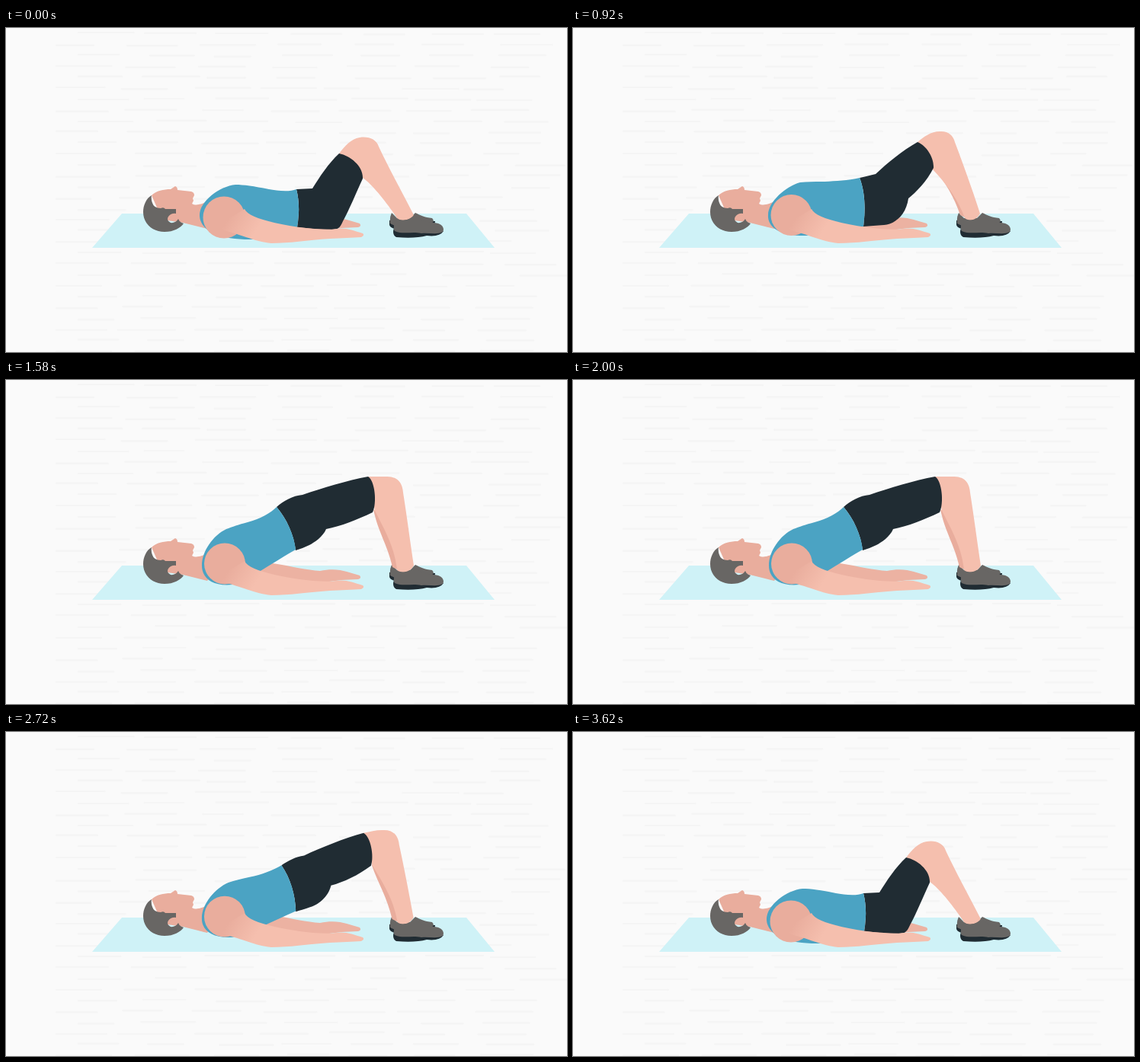
These frames come from a looping animation (736x426 px, 3640 ms). An HTML page:

```html
<!DOCTYPE html>
<html lang="en">
<head>
<meta charset="utf-8">
<title>Glute bridge</title>
<style>
  html, body { margin: 0; width: 100%; height: 100%; overflow: hidden; background: #fafafa; }
  svg { display: block; width: 736px; height: 426px; }
  .skin { fill: #f5bfae; }
  .shade { fill: #e9ad9d; }
  .grey { fill: #686664; }
  .dark { fill: #202c33; }
  .shirt { fill: #4ba3c3; }
</style>
</head>
<body>
<svg viewBox="0 0 736 426">
  <defs>
    <linearGradient id="armTone" gradientUnits="userSpaceOnUse" x1="296" y1="243" x2="330" y2="264">
      <stop stop-color="#e9ad9d"/><stop offset="1" stop-color="#f5bfae"/>
    </linearGradient>
  </defs>
  <g id="paper" stroke="#f5f5f5" stroke-width="2.5" stroke-linecap="round"></g>
  <path fill="#cff2f7" d="M152 244H604L641 289H113Z"/>

  <!-- far arm and shoe -->
  <path fill="#ecb2a2" d="M330 247L350 241C375 245 395 250 412 251C425 248 438 249 447 252L464 257Q467 261 462 262L440 263L400 268L330 264Z"/>
  <path class="dark" d="M503 253V259Q505 264 512 264L558 259Q563 259 563 254Z"/>
  <path class="grey" d="M506 243Q503 249 504 257L512 261L558 257Q563 254 559 250C549 249 543 246 537 243L530 250L513 250Z"/>

  <path id="farLeg" class="shade"/>
  <path id="leg" class="skin"/>

  <!-- near shoe -->
  <path class="dark" d="M509 263Q506 272 512 275Q537 277 552 273Q569 275 574 267Z"/>
  <path class="grey" d="M513 251Q518 254 526 252Q532 250 535 246C542 250 549 256 562 256C572 257 576 263 573 268C566 272 556 269 545 270C532 267 522 272 510 267C507 262 510 255 513 251Z"/>

  <!-- neck, head -->
  <path class="shade" d="M191 220C197 214 207 212 216 212L222 208Q225 209 225 213L243 215Q247 216 247 220L245 224L246 227L244 231C249 234 255 232 262 229L275 250L264 264Q248 260 232 256L205 252Z"/>
  <path class="grey" d="M191 220C184 224 180 233 180 242C180 257 192 268 208 268C220 268 229 263 233 257Q227 255 226 251Q222 257 216 256Q210 253 213 248Q217 243 223 244V238H209Q207 235 203 237Q194 237 192 230Q190 225 191 220Z"/>

  <path id="shorts" class="dark"/>
  <path id="shirt" class="shirt"/>
  <circle id="shoulder" class="shade"/>
  <path fill="url(#armTone)" d="M313 238C317 248 345 256 385 262C400 264 420 266 434 264C445 262 455 266 468 270Q471 273 466 275C455 276 440 276 425 277C395 279 372 283 348 283C325 281 308 270 272 263Z"/>
</svg>
<script>
const LOOP = 3640, MID = 0.45;
const $ = id => document.getElementById(id);

// Each outline in three poses: lying, halfway, raised.
const poses = {
  shorts: [
    "M381 212C388 212 395 211 402 211C412 195 423 178 437 165C452 168 469 182 468 198C460 215 450 240 442 254C438 264 434 265 428 265C412 265 398 263 382 262C385 245 385 228 381 212Z",
    "M376 197C384 195 390 194 397 192C412 178 432 161 452 150C463 154 474 170 473 184C464 202 450 216 440 224C437 246 422 258 408 259C398 260 390 260 381 261C384 238 383 215 376 197Z",
    "M355 167C364 159 376 152 389 151C415 142 448 132 475 127C484 132 487 162 481 174C460 184 440 192 420 196C416 206 404 214 398 217C392 220 386 222 380 224C378 204 368 182 355 167Z"
  ],
  shirt: [
    "M381 212C372 216 355 214 345 212C325 208 312 206 301 206C280 208 254 228 254 246C254 264 275 279 325 278C345 275 365 266 382 262C385 245 385 228 381 212Z",
    "M376 197C360 201 345 201 330 202C318 202 308 202 298 203C280 208 256 228 256 246C255 262 272 274 306 273C335 268 360 262 381 261C384 238 383 215 376 197Z",
    "M355 167C347 175 333 183 317 187C305 190 297 193 289 196C272 204 257 225 257 244C257 260 270 272 298 269C320 262 345 243 380 223C378 204 368 182 355 167Z"
  ],
  leg: [
    "M437 165C445 155 452 146 464 144C475 142 486 146 489 156C505 190 522 220 535 246C530 254 517 254 513 250C500 230 480 205 468 197Z",
    "M452 150C460 143 470 136 481 136C492 135 499 141 501 150C513 182 526 218 534 244C529 254 518 254 514 250C505 225 490 205 472 186Z",
    "M475 127C485 127 490 127 498 127C512 126 520 134 521 148C526 180 531 218 535 244C530 254 517 254 513 250C510 222 500 203 484 172Z"
  ],
  farLeg: [
    "M472 195C485 208 500 225 514 246L520 250L495 190Z",
    "M474 186C488 202 500 222 508 246L516 250L498 190Z",
    "M482 170C488 200 500 215 507 246L515 250L500 180Z"
  ]
};

const ease = x => (1 - Math.cos(Math.PI * Math.min(1, Math.max(0, x)))) / 2;
const lift = t => ease((t - 370) / 1180) - ease((t - 2440) / 1200);

// Quadratic curve through the three poses
const blend = (p, [a, b, c]) =>
  a * (p - MID) * (p - 1) / MID +
  b * p * (p - 1) / (MID * (MID - 1)) +
  c * p * (p - MID) / (1 - MID);

function morph(p, shapes) {
  const numbers = shapes.map(s => s.match(/\d+/g));
  let i = 0;
  return shapes[0].replace(/\d+/g, () => {
    const value = blend(p, numbers.map(n => +n[i])).toFixed(2);
    i++;
    return value;
  });
}

function drawPaper() {
  let seed = 7, lines = "";
  const random = () => (seed = seed * 16807 % 2147483647) / 2147483647;
  for (let row = 0; row < 30; row++) {
    const y = 6 + row * 14.4;
    for (let x = row % 2 ? 66 : 95; x < 690; x += 80 + random() * 25) {
      lines += `M${x} ${y + random() * 3}h${45 + random() * 30}`;
    }
  }
  $("paper").innerHTML = `<path d="${lines}"/>`;
}

function draw(now) {
  const p = lift(now % LOOP);
  for (const id in poses) $(id).setAttribute("d", morph(p, poses[id]));
  const shoulder = { cx: [286, 286.5, 287], cy: [249, 246, 241.5], r: [27.5, 27, 27] };
  for (const key in shoulder) $("shoulder").setAttribute(key, blend(p, shoulder[key]));
  requestAnimationFrame(draw);
}

drawPaper();
draw(performance.now());
</script>
</body>
</html>
```
